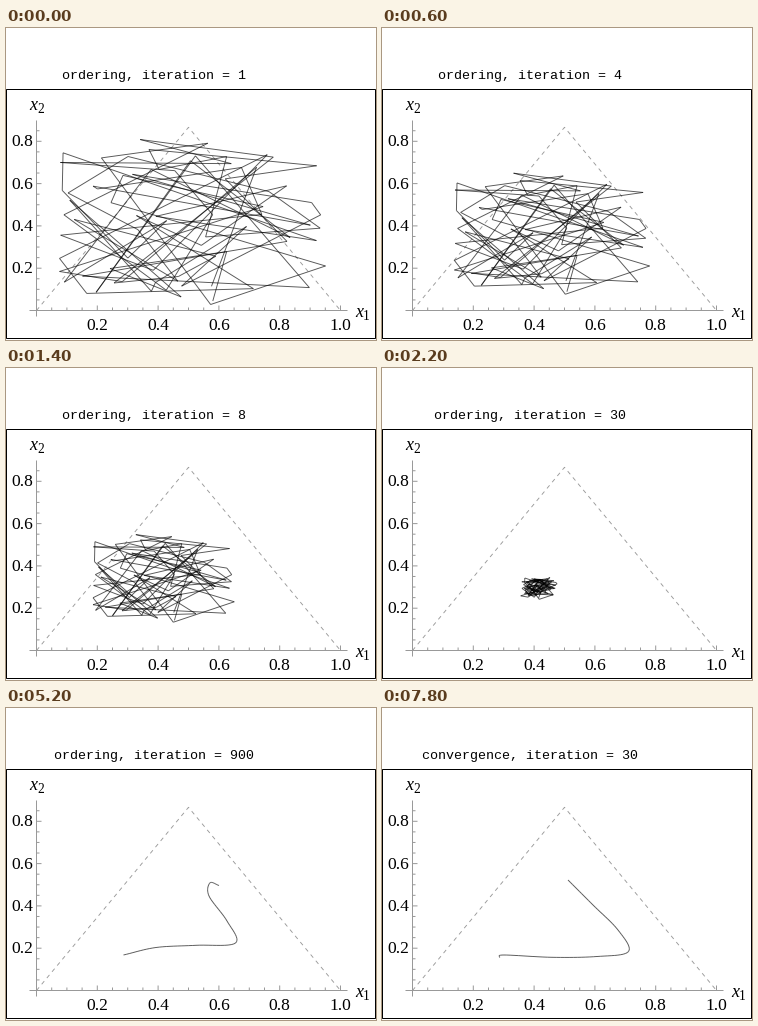
Write a matplotlib script that moves like this. It is 370 px wide and 312 px high and loops after 8000 ms.

```python
import numpy as np
import matplotlib.pyplot as plt
from matplotlib.animation import FuncAnimation
from matplotlib.collections import LineCollection
from matplotlib.patches import Rectangle

W, H, DPI = 370, 312, 100
PX = 72 / DPI                      # one pixel in points
X0, Y0, SX, SY = 30.5, 282.5, 304, 211.5
FRAMES, STEP = 40, 200
ORDERING = 28                      # frames in the first phase
NODES = 78
GRAY = "#999999"

plt.rcParams["path.snap"] = False
fig = plt.figure(figsize=(W / DPI, H / DPI), dpi=DPI, facecolor="white")
ax = fig.add_axes([0, 0, 1, 1])
ax.set_xlim(0, W)
ax.set_ylim(H, 0)
ax.axis("off")


def stroke(xs, ys, width=1.0, **kw):
    ax.plot(xs, ys, color=GRAY, lw=width * PX, **kw)


def label(x, y, s, size, font="Liberation Serif", **kw):
    return ax.text(x, y, s, fontsize=size * PX, family=font,
                   va="baseline", **kw)


def draw_axes():
    ax.add_patch(Rectangle((0.5, 61.5), 369, 249, fill=False,
                           ec="black", lw=PX))
    stroke([24, 341], [Y0, Y0])
    stroke([X0, X0], [93, 288])
    for k in range(1, 21):
        major = k % 4 == 0
        size = 4.5 if major else 2.5
        x, y = X0 + k / 20 * SX, Y0 - k / 20 * SY
        stroke([x, x], [Y0, Y0 - size])
        if major:
            label(x, 302, f"{k / 20:.1f}", 17.5, ha="center")
        if k < 18:
            stroke([X0, X0 + size], [y, y])
            if major:
                label(27, y + 5, f"{k / 20:.1f}", 17.5, ha="right")
    for x, y, sub in ((349, 289, "1"), (23, 82, "2")):
        label(x, y, "x", 18, style="italic")
        label(x + 8, y + 3, sub, 13.5)
    apex = Y0 - SY * np.sqrt(3) / 2
    stroke([X0, X0 + SX / 2, X0 + SX], [Y0, apex, Y0], width=0.9,
           dashes=(4.5, 4.5))


def tangle():
    """Random nodes, denser to the upper left, filling the first box."""
    p = np.random.default_rng(7).random((NODES, 2)) ** 1.2
    p = (p - p.min(axis=0)) / np.ptp(p, axis=0)
    return (53.5, 111.5) + p * (266, 165)


def spread(points):
    """Place the nodes along a Catmull-Rom curve through the points."""
    p = np.array(points, float)
    p = np.vstack([2 * p[0] - p[1], p, 2 * p[-1] - p[-2]])
    t = np.linspace(0, len(points) - 1, NODES)
    i = np.minimum(t.astype(int), len(points) - 2)
    u = (t - i)[:, None]
    a, b, c, d = p[i], p[i + 1], p[i + 2], p[i + 3]
    return b + 0.5 * u * (c - a + u * (2 * a - 5 * b + 4 * c - d
                                       + u * (3 * (b - c) + d - a)))


HOOK = [(117.5, 247), (150, 239.5), (190, 237.3), (229.5, 235),
        (221, 213), (203, 188), (204, 174.8), (213, 177.5)]
BEND = [(117.5, 249.5), (122, 247), (170, 249.3), (215, 248.5),
        (246.5, 243.5), (236, 222), (211, 197), (186, 172)]

# Frame number and the curve the chain settles on there
KEYS = {
    0: [(124.5, 238), (124.5, 238)],
    3: [(124.5, 238), (124.5, 238)],
    7: [(125, 229), (125, 229)],
    11: [(150, 226), (157, 219)],
    18: [(164.5, 233), (187.5, 205)],
    21: [(69, 246), (165, 231), (198, 184)],
    26: HOOK,
    28: BEND,
    39: BEND,
}
marks = list(KEYS)
curves = [spread(p) for p in KEYS.values()]
start = tangle()


def iteration(f):
    """1, 2 ... 10, 20 ... 100, 200 ..., starting over in each phase."""
    power, digit = divmod(f % ORDERING, 9)
    return (digit + 1) * 10 ** power


def chain(f):
    j = min(np.searchsorted(marks, f, side="right"), len(marks) - 1)
    u = (f - marks[j - 1]) / (marks[j] - marks[j - 1])
    target = (1 - u) * curves[j - 1] + u * curves[j]
    n = iteration(f) + 1000 * (f >= ORDERING)
    s = max(np.exp(-0.12 * (n - 1) ** 0.85) - 0.003, 0) if n > 1 else 1
    if s == 0:
        noise = np.random.default_rng(f).normal(0, 1.2, (7, 2))
        target = target + np.sin(np.pi * u) * spread(noise)
    return s * start + (1 - s) * target


draw_axes()
# Separate segments, so that crossings darken
net = LineCollection([], colors="black", linewidths=0.95 * PX, alpha=0.65)
ax.add_collection(net, autolim=False)
title = label(148, 51, "", 13.33, "Liberation Mono", ha="center")


def update(f):
    phase = "ordering" if f < ORDERING else "convergence"
    title.set_text(f"{phase}, iteration = {iteration(f)}")
    p = chain(f)
    net.set_segments(np.stack([p[:-1], p[1:]], axis=1))
    return net, title


anim = FuncAnimation(fig, update, frames=FRAMES, interval=STEP,
                     repeat=True, repeat_delay=0, blit=False)
plt.show()
```
